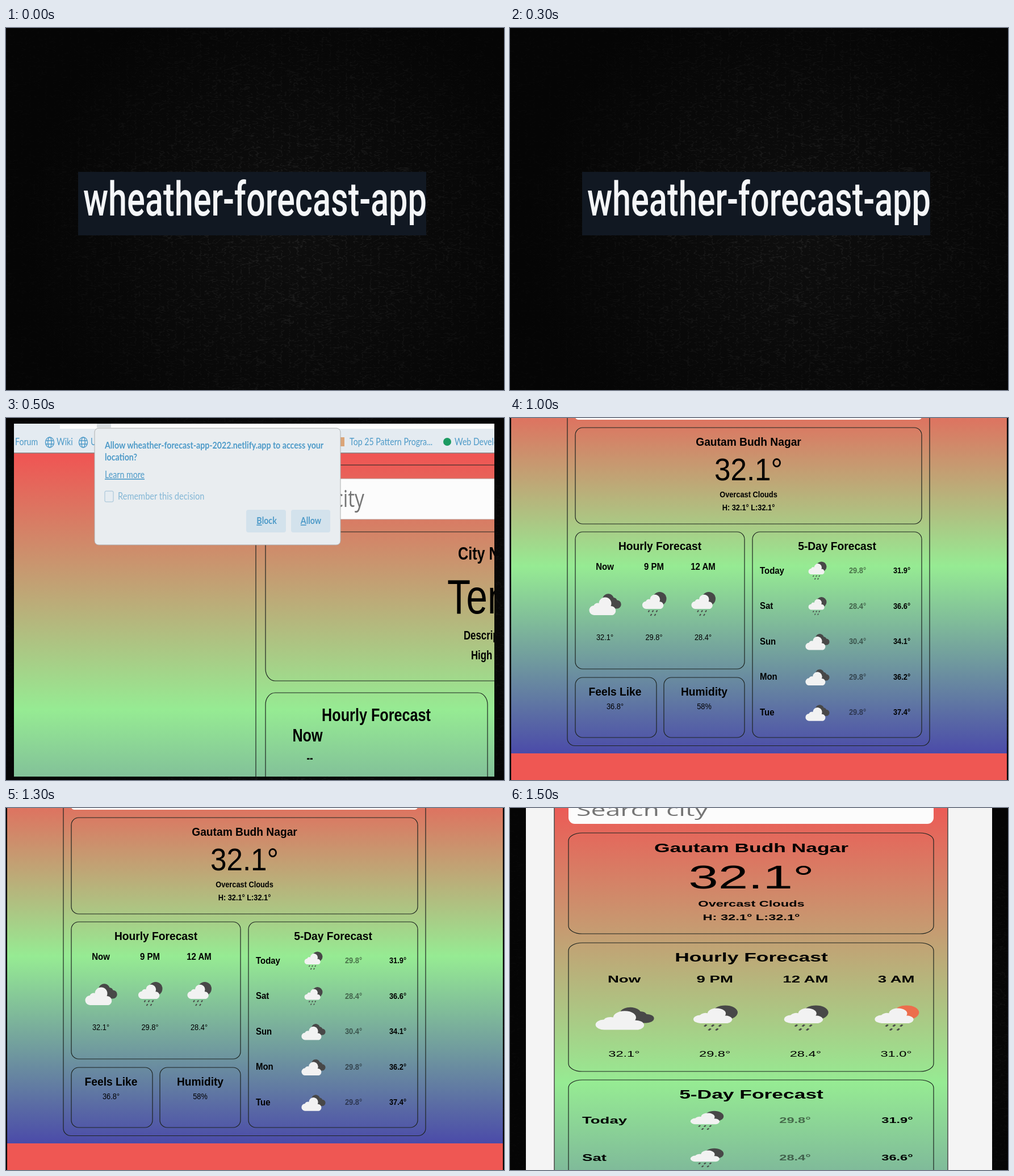
These frames come from a looping animation (877 by 639 pixels, 2 s). An HTML page:

```html
<!DOCTYPE html>
<html lang="en">
<head>
<meta charset="utf-8">
<title>Weather forecast slides</title>
<style>
  html, body { margin: 0; height: 100%; overflow: hidden; background: #050505; }
  svg { display: block; }
  text { font-family: "Liberation Sans", Arial, sans-serif; }
  .ui { font-family: Lato, sans-serif; fill: #4d9ac8; }
  .search { font-family: "Open Sans", sans-serif; fill: #757575; }
  .title { font-family: Roboto, sans-serif; font-weight: 500; fill: #f4f6f8; }
  .b { font-weight: bold; }
  .mid { text-anchor: middle; }
  .end { text-anchor: end; }
  .low { font-weight: bold; opacity: .5; }
  .u { text-decoration: underline; }
  .pale { opacity: .65; }
  .box { fill: none; stroke: #1d2420; stroke-width: 1.2; }
</style>
</head>
<body>
<svg id="stage" width="100%" height="100%" viewBox="0 0 877 639" preserveAspectRatio="none">
  <defs>
    <radialGradient id="glow" gradientUnits="userSpaceOnUse" cx="500" cy="370" r="470">
      <stop stop-color="#0e0e0e"/><stop offset="1" stop-color="#050505"/>
    </radialGradient>
    <radialGradient id="fade" gradientUnits="userSpaceOnUse" cx="510" cy="360" r="460">
      <stop stop-color="#fff"/><stop offset="1" stop-color="#222"/>
    </radialGradient>
    <mask id="spot"><rect width="877" height="639" fill="url(#fade)"/></mask>
    <filter id="grain" x="0" y="0" width="1" height="1" color-interpolation-filters="sRGB">
      <feTurbulence type="turbulence" baseFrequency=".07 .15" numOctaves="2" seed="4"/>
      <feColorMatrix values="0 0 0 0 .15  0 0 0 0 .15  0 0 0 0 .15  0 0 0 -7 1"/>
    </filter>
    <path id="cloud" fill="#f2f2f2" d="M-16 15A8.5 8.5 0 0 1-17-2A7 7 0 0 1-8-6A11 11 0 1 1 13-1A8.2 8.2 0 0 1 16 15Z"/>
    <g id="clouds">
      <path fill="#484848" d="M4 7.5V1A10 10 0 1 1 15.500-12A7 7 0 0 1 21.500-7.500A7.500 7.500 0 0 1 21 7.500Z"/>
      <use href="#cloud" x="-2.5" y="4"/>
    </g>
    <g id="rain">
      <circle cx="10" cy="-10" r="12"/>
      <use href="#cloud" transform="translate(-.6 -4) scale(.8)"/>
      <path stroke="#484848" stroke-width="2" d="M-8 10.500l-2 3M-1 10.500l-2 3M6 10.500l-2 3M-4 17l-2 3M3 17l-2 3"/>
    </g>
  </defs>
  <rect width="877" height="639" fill="url(#glow)"/>
  <g mask="url(#spot)"><rect width="877" height="639" filter="url(#grain)"/></g>
</svg>
<script>
const stage = document.getElementById('stage');

const rect = (x, y, x2, y2, fill, r = 0, extra = '') =>
  `<rect x="${x}" y="${y}" width="${x2 - x}" height="${y2 - y}" rx="${r}" fill="${fill}" ${extra}/>`;
const box = (x, y, x2, y2, rx, ry = rx) =>
  `<rect class="box" x="${x}" y="${y}" width="${x2 - x}" height="${y2 - y}" rx="${rx}" ry="${ry}"/>`;
const clip = (x, y, x2, y2, body) =>
  `<svg x="${x}" y="${y}" width="${x2 - x}" height="${y2 - y}" viewBox="${x} ${y} ${x2 - x} ${y2 - y}">${body}</svg>`;
// Each screen has its own aspect, so text is written at that screen's scale.
const writer = (sx, sy) => (x, y, size, str, cls = 'b mid') =>
  `<text transform="translate(${x} ${y}) scale(${sx} ${sy})" font-size="${size}" class="${cls}">${str}</text>`;
const icon = (name, x, y, sx, sy, disc = '#484848') =>
  `<use href="#${name}" fill="${disc}" transform="translate(${x} ${y}) scale(${sx} ${sy})"/>`;
const sky = (id, top, bottom) =>
  `<linearGradient id="${id}" gradientUnits="userSpaceOnUse" x1="0" x2="0" y1="${top}" y2="${bottom}">
    <stop stop-color="#f05453"/><stop offset=".5" stop-color="#96eb93"/><stop offset="1" stop-color="#4b4ba9"/>
  </linearGradient>`;

const hours = [['Now', 'clouds', '32.1°'], ['9 PM', 'rain', '29.8°'], ['12 AM', 'rain', '28.4°'], ['3 AM', 'rain', '31.0°', '#ec6e4c']];
const days = [['Today', 'rain', '29.8°', '31.9°'], ['Sat', 'rain', '28.4°', '36.6°'], ['Sun', 'clouds', '30.4°', '34.1°'],
  ['Mon', 'clouds', '29.8°', '36.2°'], ['Tue', 'clouds', '29.8°', '37.4°']];

function titleCard() {
  const write = writer(.715, 1);
  return clip(127, 254, 740, 366, rect(127, 254, 740, 366, '#111822') +
    write(136, 331, 83, 'wheather-forecast-app', 'title'));
}

function permission() {
  const page = writer(1.05, 1.33), ui = writer(.86, 1);
  const label = (x, y, str, cls = '') => ui(x, y, 16.5, str, 'ui ' + cls);
  const globe = x => `<g fill="none" stroke="#4d9ac8" stroke-width="1.4"><ellipse cx="${x}" cy="43" rx="7.5" ry="9"/>
    <ellipse cx="${x}" cy="43" rx="3.2" ry="9"/><path d="M${x - 7} 40h14m0 6h-14"/></g>`;
  const key = word => `<tspan class="u">${word[0]}</tspan>${word.slice(1)}`;
  return sky('sky1', 62, 968) + clip(14, 10, 860, 633,
    rect(14, 10, 860, 62, '#e4ebf1') + rect(95, 10, 860, 19, '#fdfdfd') + rect(160, 10, 185, 17, '#d9dde0') +
    label(16, 48, 'Forum') + globe(77) + label(89, 48, 'Wiki') + globe(136) + label(149, 48, 'U') +
    rect(589, 34, 596, 50, '#dba578') + label(605, 48, 'Top 25 Pattern Progra...') +
    '<circle cx="777" cy="42" r="7" fill="#1c9b62"/>' + label(790, 48, 'Web Development') +
    rect(14, 62, 860, 633, 'url(#sky1)') + rect(14, 61, 860, 62.500, '#8c8585') +
    box(440, 83, 1100, 900, 17, 21) + rect(457, 107, 1100, 179, '#fcfcfc', 6, 'stroke="#b9938c"') +
    page(631, 157, 32, 'Search city', 'search end') +
    box(457, 201, 1100, 464, 17, 21) + box(457, 485, 848, 800, 17, 21) +
    page(796, 250, 24, 'City Name', 'b') + page(777, 345, 64, 'Temp', '') +
    page(806, 391, 16, 'Description', 'b') + page(819, 426, 16, 'High / Low', 'b') +
    page(652, 535, 24, 'Hourly Forecast') + page(531, 571, 24, 'Now') + page(535, 607, 16, '--') +
    rect(156, 18, 589, 224, '#e9edf0', 7, 'stroke="#aeb0b0"') +
    label(174, 54, 'Allow wheather-forecast-app-2022.netlify.app to access your', 'b') + label(174, 75, 'location?', 'b') +
    label(174, 106, 'Learn more', 'u') + rect(174, 129, 189, 148, '#e6ecf1', 2, 'stroke="#9fc0d6"') +
    ui(197, 144, 17, 'Remember this decision', 'ui pale') +
    rect(423, 162, 493, 202, '#d3e2ec', 4) + rect(502, 162, 571, 202, '#d3e2ec', 4) +
    label(459, 187, key('Block'), 'b mid') + label(537, 187, key('Allow'), 'b mid'));
}

// Heading block shared by both filled-in layouts.
const summary = (write, x, [city, temp, text, range]) =>
  write(x, city, 24, 'Gautam Budh Nagar') + write(x, temp, 64, '32.1°', 'mid') +
  write(x, text, 16, 'Overcast Clouds') + write(x, range, 16, 'H: 32.1° L:32.1°');

function desktop() {
  const write = writer(.8, .86);
  return sky('sky2', -68, 592) + rect(2, 0, 875, 592, 'url(#sky2)') + rect(2, 592, 875, 639, '#ef5753') +
    box(101, -60, 739, 578.500, 13) + rect(115, -40, 725, 3, '#fcfcfc', 5) +
    box(115, 17, 725, 187, 13) + box(115, 201, 413, 443, 13) + box(427, 201, 725, 564, 13) +
    box(115, 458, 258, 564, 13) + box(271, 458, 413, 564, 13) +
    summary(write, 420, [49, 110, 140, 163]) +
    write(264, 233, 24, 'Hourly Forecast') + write(576, 233, 24, '5-Day Forecast') +
    hours.slice(0, 3).map(([time, kind, temp], i) => {
      const x = 167 + i * 86.500;
      return write(x, 268, 18.7, time) + icon(kind, x, 329, 1, 1) + write(x, 392, 16, temp, 'mid');
    }).join('') +
    days.map(([day, kind, low, high], i) => {
      const y = 274 + i * 62.600;
      return write(440, y + .5, 18.7, day, 'b') + icon(kind, 541, y - 4, .75, .75) +
        write(612, y, 16, low, 'low mid') + write(690, y, 16, high);
    }).join('') +
    write(185, 490, 24, 'Feels Like') + write(185, 514, 16, '36.8°', 'mid') +
    write(342, 490, 24, 'Humidity') + write(342, 514, 16, '58%', 'mid');
}

function mobile() {
  const write = writer(1.475, .9), sx = 1.83, sy = 1.05;
  return sky('sky3', -25, 995) + rect(28, 0, 849, 639, '#f4f4f4') +
    rect(78, -5, 771, 650, 'url(#sky3)', 0, 'stroke="#4a4a48" stroke-width="1.5"') +
    rect(103, -40, 746, 28, '#fcfcfc', 11) + write(117, 14, 31.5, 'Search city', 'search') +
    box(103, 44, 746, 222, 24, 14) + box(103, 238, 746, 465, 24, 14) + box(103, 480, 746, 900, 24, 14) +
    summary(write, 425, [78, 142, 174, 198]) +
    write(425, 271, 24, 'Hourly Forecast') + write(425, 513, 24, '5-Day Forecast') +
    hours.map(([time, kind, temp, disc], i) => {
      const x = 201 + i * 159.700;
      return write(x, 308, 18.7, time) + icon(kind, x, 371.500, sx, sy, disc) + write(x, 439, 16, temp, 'mid');
    }).join('') +
    days.slice(0, 2).map(([day, kind, low, high], i) => {
      const y = 556 + i * 66;
      return write(127, y + 1, 18.7, day, 'b') + icon(kind, 346, y - 4, sx * .75, sy * .75) +
        write(502, y, 16, low, 'low mid') + write(682, y, 16, high);
    }).join('');
}

const screens = [titleCard, permission, desktop, mobile];
stage.insertAdjacentHTML('beforeend', screens.map(draw => `<g class="screen">${draw()}</g>`).join(''));
const groups = [...stage.querySelectorAll('.screen')];

function tick() {
  const current = Math.floor(performance.now() % 2000 / 500);
  groups.forEach((g, i) => g.style.display = i === current ? '' : 'none');
  requestAnimationFrame(tick);
}
tick();
</script>
</body>
</html>
```
